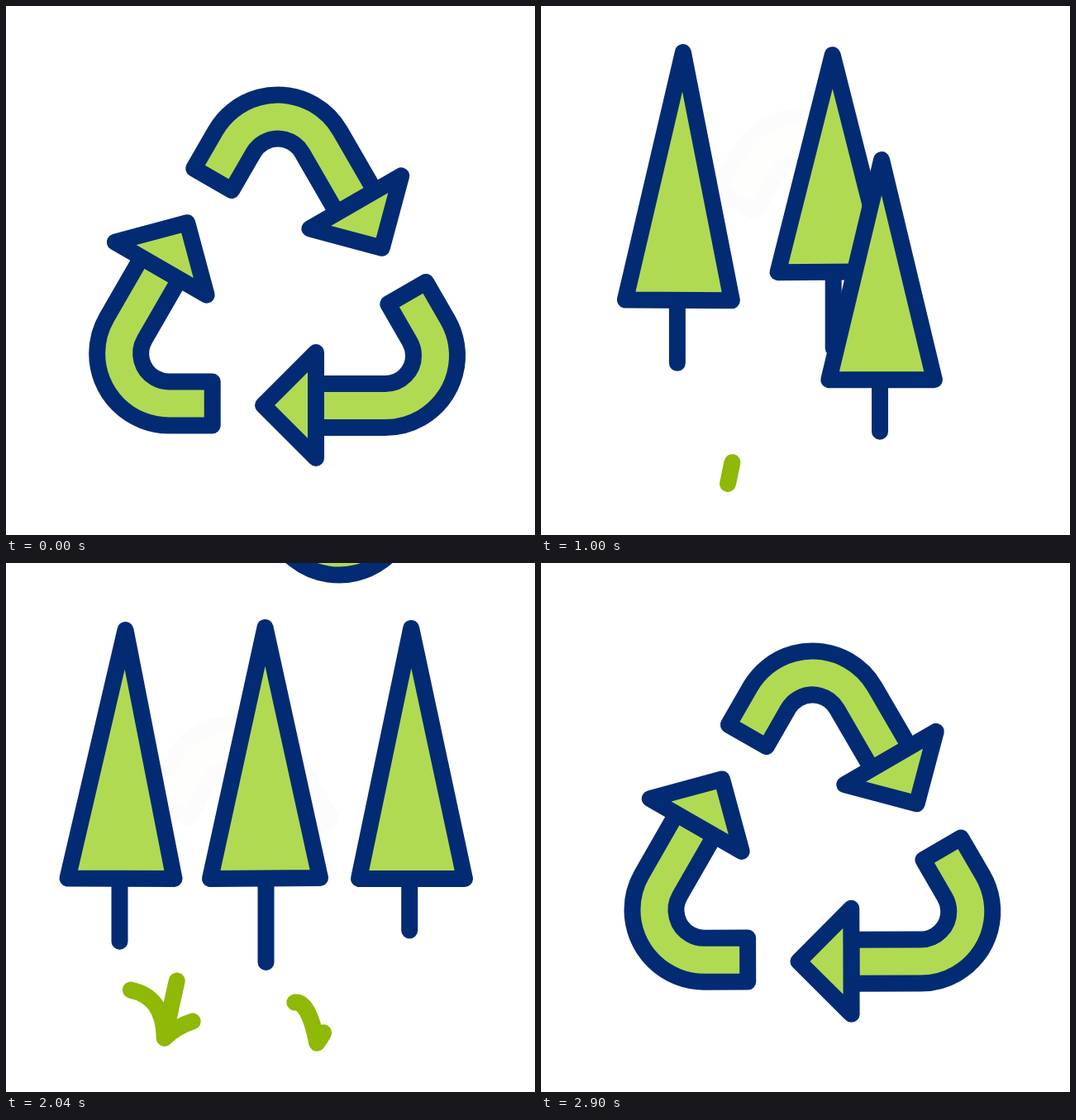
Recreate the animation shown at these times as an HTML page with a canvas. Size 640 by 640 pixels, loop 3.6 s.

```html
<!DOCTYPE html>
<html lang="en">
<head>
<meta charset="utf-8">
<title>Recycling arrows and trees</title>
<style>
  html, body { margin: 0; width: 100%; height: 100%; overflow: hidden; background: #fff; }
  canvas { display: block; width: 100vmin; height: 100vmin; }
</style>
</head>
<body>
<canvas id="stage" width="640" height="640"></canvas>
<script>
const ctx = document.getElementById('stage').getContext('2d');
const NAVY = '#032b74', GREEN = '#b1da53', GRASS = '#90b806';
const LOOP = 3600, REST = 2900, LINE = 20;
const CENTER = [328, 347], PIVOT = [328, 325], FALL = 597.5;

const clamp = v => Math.max(0, Math.min(1, v));
const span = (t, from, to) => clamp((t - from) / (to - from));
const ease = p => (1 - Math.cos(Math.PI * p)) / 2;
const mix = (a, b, p) => a + (b - a) * p;
const mixPts = (a, b, p) => a.map((v, i) => [mix(v[0], b[i][0], p), mix(v[1], b[i][1], p)]);

// Each arrow is the same drawing, turned by a third and nudged.
const ARROWS = [
  { turn: 240, dx: 0.5, dy: -1 },
  { turn: 120, dx: 0.5, dy: -2 },
  { turn: 0, dx: 0, dy: 0 }
];
const HEAD = [[47, 72], [-17, 136], [47, 200]];

// Points run tip, bottom left, bottom right; "order" picks the matching head corners.
const TREES = [
  { arrow: 0, order: [2, 0, 1],
    from: [[367, 51], [301, 296], [433, 295]], to: [[320, 78], [253.5, 382], [386.5, 381]],
    trunk: 101.5, lean: 1, grow: [680, 1080] },
  { arrow: 1, order: [1, 0, 2],
    from: [[181, 45], [111, 344], [240, 345]], to: [[151, 81], [81, 381.5], [210, 382]],
    trunk: 76, lean: -7, grow: [480, 850] },
  { arrow: 2, order: [0, 1, 2],
    from: [[375, 233], [311, 483], [438.5, 483]], to: [[496.7, 79], [433.5, 382], [561.5, 382]],
    trunk: 62.5, lean: -2, grow: [560, 930] }
];

// Blades: control point, end point, growth times.
const TUFTS = [
  { x: 226, y: 578, blades: [
    [[7, -34], [15, -69], 880, 1200],
    [[-1, -50], [-41, -58], 1200, 1540],
    [[15, -14], [34, -20], 1540, 1850]] },
  { x: 410.5, y: 584, blades: [
    [[-10, -51], [-27, -49], 1700, 2020],
    [[12, -15], [22, -48], 1960, 2200]] }
];

function place(arrow, [x, y]) {
  const a = arrow.turn * Math.PI / 180, c = Math.cos(a), s = Math.sin(a);
  return [CENTER[0] + arrow.dx + x * c - y * s, CENTER[1] + arrow.dy + x * s + y * c];
}

function paint() {
  ctx.fillStyle = GREEN;
  ctx.strokeStyle = NAVY;
  ctx.fill();
  ctx.stroke();
}

function triangle(pts) {
  ctx.beginPath();
  pts.forEach(p => ctx.lineTo(...p));
  ctx.closePath();
  paint();
}

function band(arrow) {
  const tilt = -Math.PI / 6, down = Math.PI / 2;
  ctx.save();
  ctx.translate(CENTER[0] + arrow.dx, CENTER[1] + arrow.dy);
  ctx.rotate(arrow.turn * Math.PI / 180);
  ctx.beginPath();
  ctx.moveTo(134.2, 13.5);
  ctx.lineTo(180.1, -13);
  ctx.arc(131, 76, 87, tilt, down);
  ctx.lineTo(47, 163);
  ctx.lineTo(47, 110);
  ctx.arc(131, 76, 34, down, tilt, true);
  ctx.closePath();
  paint();
  ctx.restore();
}

function symbol(t) {
  const left = 1 - ease(span(t, 1820, 2930));
  ctx.save();
  ctx.translate(PIVOT[0], PIVOT[1] - FALL * left);
  ctx.rotate(-left * Math.PI / 2);
  ctx.translate(-PIVOT[0], -PIVOT[1]);
  for (const arrow of ARROWS) {
    band(arrow);
    triangle(HEAD.map(p => place(arrow, p)));
  }
  ctx.restore();
}

function tree(spec, t, rise, drift) {
  const head = spec.order.map(i => place(ARROWS[spec.arrow], HEAD[i]));
  const pts = mixPts(mixPts(head, spec.from, rise), spec.to, drift);
  const grown = ease(span(t, ...spec.grow));
  if (grown > 0) {
    const x = pts[0][0] + spec.lean, y = (pts[1][1] + pts[2][1]) / 2;
    ctx.strokeStyle = NAVY;
    ctx.beginPath();
    ctx.moveTo(x, y);
    ctx.lineTo(x, y + spec.trunk * grown);
    ctx.stroke();
  }
  triangle(pts);
}

function blade([ctl, end, from, to], t) {
  const p = span(t, from, to);
  if (!p) return;
  // The first part of a quadratic curve is again a quadratic curve.
  const tip = i => 2 * p * (1 - p) * ctl[i] + p * p * end[i];
  ctx.beginPath();
  ctx.moveTo(0, 0);
  ctx.quadraticCurveTo(ctl[0] * p, ctl[1] * p, tip(0), tip(1));
  ctx.stroke();
}

const leave = (t, start) => Math.max(0, t - start) ** 2;

function forest(t) {
  const rise = ease(span(t, 0, 400)), drift = ease(span(t, 392, 2029));
  ctx.save();
  ctx.translate(-0.0025 * leave(t, 1990), 0);
  ARROWS.forEach((arrow, i) => {
    const alpha = Math.max(1 - rise, i ? 0 : 0.01);
    if (!alpha) return;
    ctx.save();
    ctx.globalAlpha = alpha;
    if (!i) ctx.translate(-46 * drift, 86 * drift);
    band(arrow);
    ctx.restore();
  });
  TREES.forEach(spec => tree(spec, t, rise, drift));
  ctx.restore();
}

function grass(t) {
  const away = leave(t, 1924);
  ctx.strokeStyle = GRASS;
  for (const tuft of TUFTS) {
    ctx.save();
    ctx.translate(tuft.x - 0.0025 * away, tuft.y - 0.00025 * away);
    tuft.blades.forEach(b => blade(b, t));
    ctx.restore();
  }
}

function draw(now) {
  const t = Math.min(now % LOOP, REST);
  ctx.fillStyle = '#fff';
  ctx.fillRect(0, 0, 640, 640);
  ctx.lineWidth = LINE;
  ctx.lineJoin = ctx.lineCap = 'round';
  if (t < 2500) {
    forest(t);
    grass(t);
  }
  if (t > 1820) symbol(t);
}

const start = performance.now();
function tick() {
  draw(performance.now() - start);
  requestAnimationFrame(tick);
}
draw(0);
requestAnimationFrame(tick);
</script>
</body>
</html>
```
